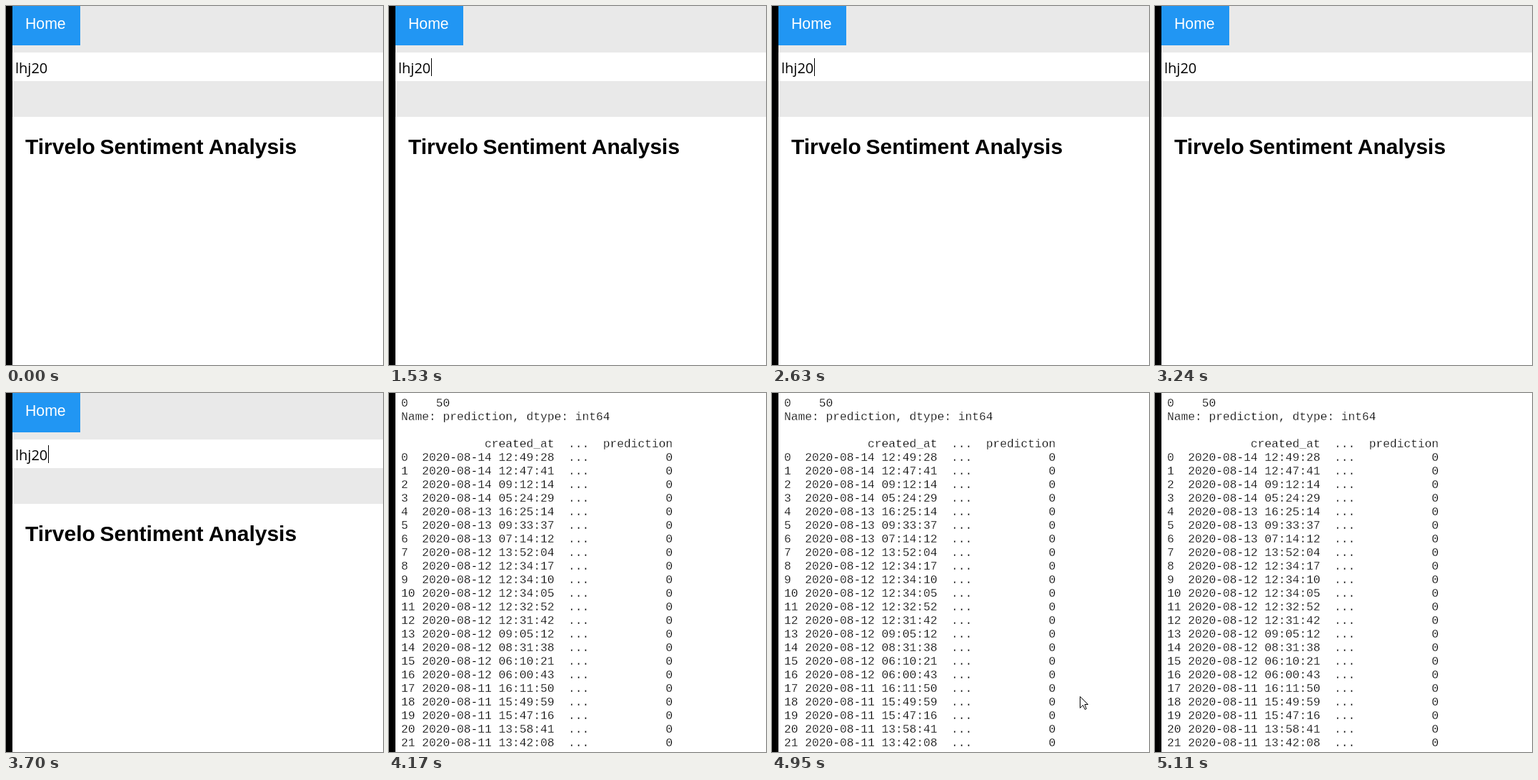
Write an HTML page that moves like this. It is 528x502 px and loops after 6.67 s.

```html
<!DOCTYPE html>
<html lang="en">
<head>
<meta charset="utf-8">
<title>Sentiment analysis demo</title>
<style>
html, body { margin: 0; width: 100%; height: 100%; overflow: hidden; background: #fff; }
#stage { position: absolute; left: 0; top: 0; width: 528px; height: 502px; overflow: hidden; color: #000; }
#stage * { position: absolute; margin: 0; white-space: pre; }
#form { left: 0; top: 0; width: 528px; height: 502px; }
.bar { left: 0; top: 0; width: 528px; height: 155px; background: #e9e9e9; }
.home { left: 9px; top: 0; width: 95px; height: 55px; background: #2196f3; }
.home span { left: 18px; top: 13px; color: #fff; font: 21.25px/24px "Liberation Sans", Arial, sans-serif; }
.field { left: 0; top: 65px; width: 528px; height: 40px; background: #fff; }
.field span { left: 13px; top: 8px; font: 20px/27px "Open Sans", sans-serif; }
#caret { left: 59px; top: 73px; width: 1px; height: 25px; background: #000; }
h2 { top: 180px; font: bold 30px/33px "Liberation Sans", Arial, sans-serif; }
/* the white outline thins the strokes */
#table { left: 17px; top: 5px; font: 16.25px/19px "Liberation Mono", "Courier New", monospace; -webkit-text-stroke: .3px #fff; }
#edge { left: 0; top: 0; width: 9px; height: 502px; background: #000; }
#pointer { left: 0; top: 0; }
</style>
</head>
<body>
<div id="stage">
  <div id="form">
    <div class="bar"></div>
    <div class="home"><span>Home</span></div>
    <div class="field"><span>lhj20</span></div>
    <div id="caret"></div>
    <h2 style="left:27px">Tirvelo</h2>
    <h2 style="left:131.5px">Sentiment Analysis</h2>
  </div>
  <pre id="table">
0    50
Name: prediction, dtype: int64

            created_at  ...  prediction
0  2020-08-14 12:49:28  ...           0
1  2020-08-14 12:47:41  ...           0
2  2020-08-14 09:12:14  ...           0
3  2020-08-14 05:24:29  ...           0
4  2020-08-13 16:25:14  ...           0
5  2020-08-13 09:33:37  ...           0
6  2020-08-13 07:14:12  ...           0
7  2020-08-12 13:52:04  ...           0
8  2020-08-12 12:34:17  ...           0
9  2020-08-12 12:34:10  ...           0
10 2020-08-12 12:34:05  ...           0
11 2020-08-12 12:32:52  ...           0
12 2020-08-12 12:31:42  ...           0
13 2020-08-12 09:05:12  ...           0
14 2020-08-12 08:31:38  ...           0
15 2020-08-12 06:10:21  ...           0
16 2020-08-12 06:00:43  ...           0
17 2020-08-11 16:11:50  ...           0
18 2020-08-11 15:49:59  ...           0
19 2020-08-11 15:47:16  ...           0
20 2020-08-11 13:58:41  ...           0
21 2020-08-11 13:42:08  ...           0</pre>
  <svg id="pointer" width="13" height="20">
    <path d="M.5 .5V16.5L4.5 12.5 7.3 18.5 9.3 17.6 7 11.5H11.5Z" fill="#fff" stroke="#000"/>
  </svg>
  <div id="edge"></div>
</div>
<script>
const LOOP = 6670, RESULT_AT = 4170;
const CARET_AT = 1530, BLINK = 542;
const ENTER = 4570, REST = 4650, LEAVE = 4880, GONE = 5110;

const $ = id => document.getElementById(id);
const show = (id, on) => $(id).style.visibility = on ? "visible" : "hidden";

// The pointer jumps in, rests, then sweeps down in three steps.
function pointerAt(t) {
  if (t < REST) return [435, 359];
  if (t < LEAVE) return [426, 366];
  const k = Math.min(2, Math.floor((t - LEAVE) / 70));
  return [423 + 5.5 * k + 2 * k * k, 385 + 38.5 * k].map(Math.round);
}

function draw(t) {
  const typing = t < RESULT_AT;
  const blink = Math.floor((t - CARET_AT) / BLINK);
  show("form", typing);
  show("caret", typing && blink >= 0 && blink % 2 === 0);
  show("table", !typing);
  show("pointer", t >= ENTER && t < GONE);
  const [x, y] = pointerAt(t);
  $("pointer").style.transform = `translate(${x}px, ${y}px)`;
}

const start = performance.now();
function tick() {
  draw((performance.now() - start) % LOOP);
  requestAnimationFrame(tick);
}
tick();
</script>
</body>
</html>
```
